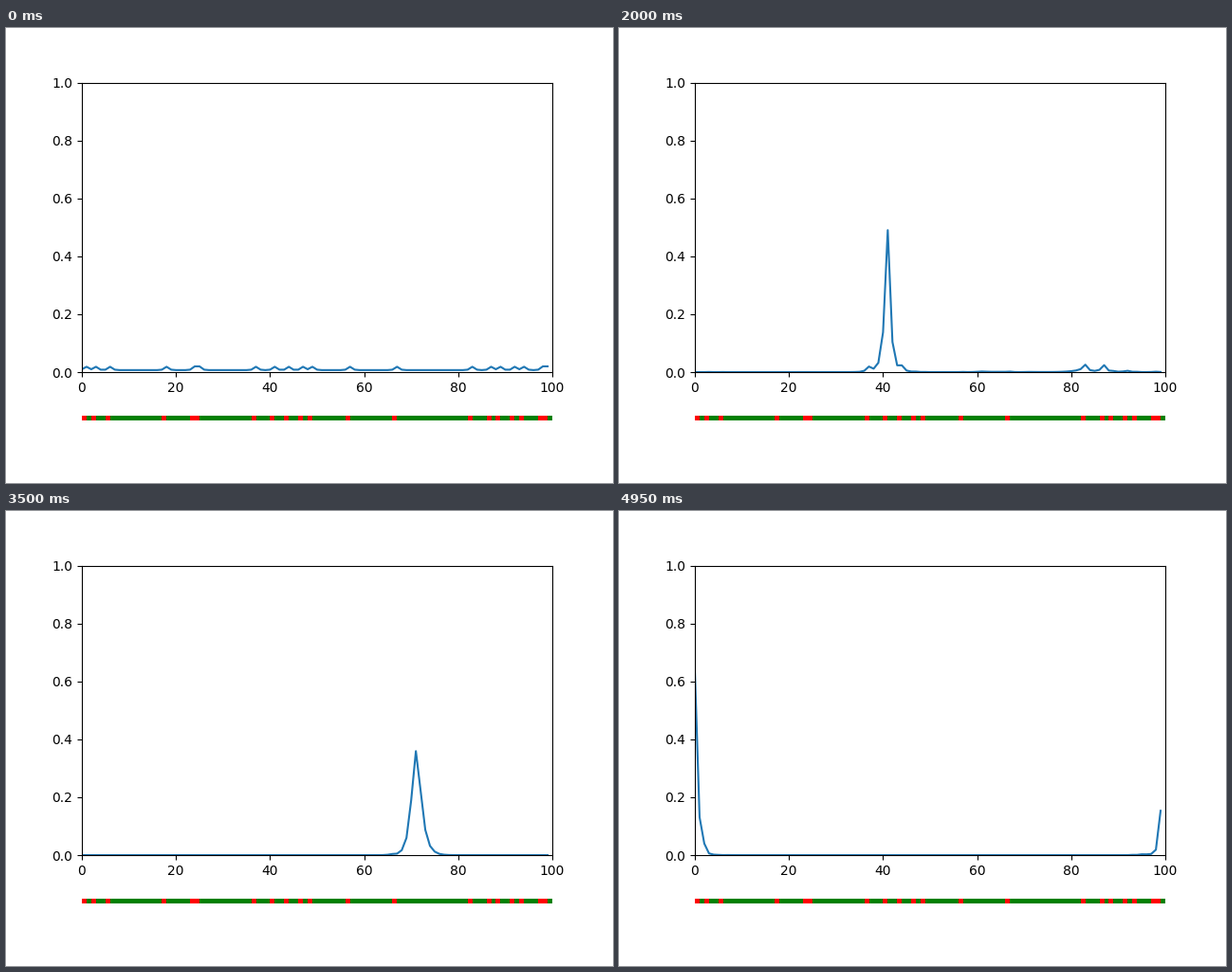
A matplotlib script for the animation above (5 s loop, 640 by 480 pixels).

```python
import matplotlib.pyplot as plt
import numpy as np
from matplotlib.animation import FuncAnimation

CELLS = 100
STEPS = 100
INTERVAL = 50  # ms
P_HIT, P_MISS = 0.6, 0.2
P_EXACT, P_SLIP = 0.8, 0.1
RED_CELLS = [0, 2, 5, 17, 23, 24, 36, 40, 43, 46,
             48, 56, 66, 82, 86, 88, 91, 93, 97, 98]
RED, GREEN = (255, 0, 0), (0, 128, 0)

is_red = np.zeros(CELLS, dtype=bool)
is_red[RED_CELLS] = True


def sense(belief, seen_red):
    weighted = belief * np.where(is_red == seen_red, P_HIT, P_MISS)
    return weighted / weighted.sum()


def move(belief):
    """Shift one cell to the right, sometimes slipping by one either way."""
    return (P_EXACT * np.roll(belief, 1)
            + P_SLIP * belief
            + P_SLIP * np.roll(belief, 2))


def localize():
    belief = np.full(CELLS, 1 / CELLS)
    history = []
    for step in range(STEPS):
        belief = move(sense(belief, is_red[step % CELLS]))
        history.append(belief)
    return history


beliefs = localize()

fig, (ax, strip) = plt.subplots(
    2, 1, figsize=(6.4, 4.8), dpi=100,
    gridspec_kw={"height_ratios": [10, 1]})

ax.set_xlim(0, CELLS)
ax.set_ylim(0, 1)
line, = ax.plot(np.arange(CELLS), beliefs[0])

world = np.where(is_red[:, None], RED, GREEN).astype(np.uint8)
strip.imshow(world[None, :, :])
strip.axis("off")


def update(step):
    line.set_ydata(beliefs[step])
    return line,


anim = FuncAnimation(fig, update, frames=STEPS, interval=INTERVAL,
                     repeat=True, repeat_delay=0)

plt.show()
```
